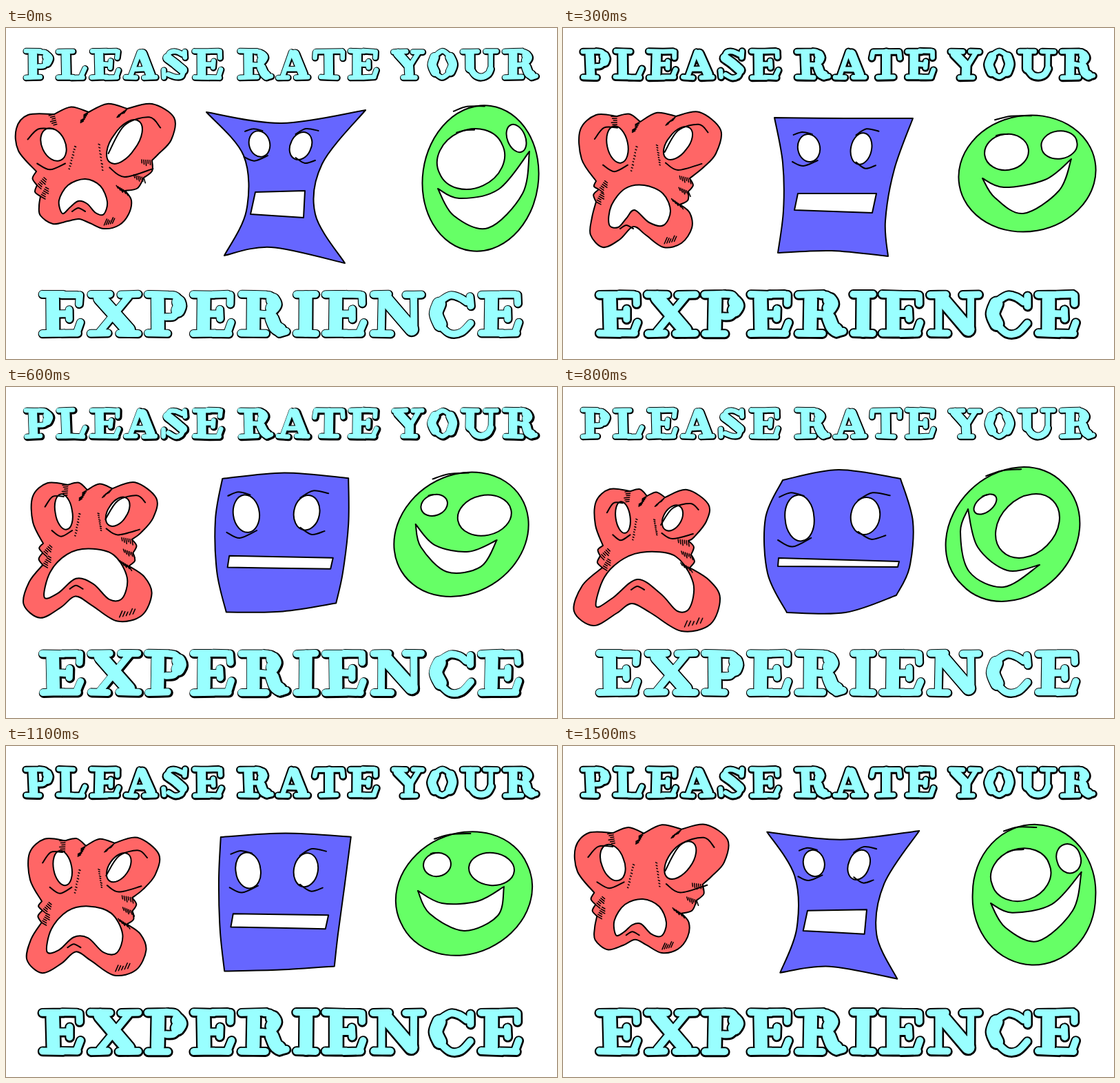
An HTML page that plays this animation: 800 px wide and 480 px high, repeating every 1600 ms.

```html
<!DOCTYPE html>
<html lang="en">
<head>
<meta charset="utf-8">
<title>Please rate your experience</title>
<style>
html, body { margin: 0; width: 100%; height: 100%; overflow: hidden; background: #fff; }
svg { display: block; width: 800px; height: 480px; }
path { fill: none; stroke: #000; stroke-width: 2; stroke-linejoin: round; stroke-linecap: round; }
</style>
</head>
<body>
<svg id="stage" viewBox="0 0 800 480" role="img" aria-label="Please rate your experience"></svg>
<script>
const STEP = 100, STEPS = 16, LAST = 8;

// Pen strokes on a 100 x 100 box; a, b and c are nibs from thick to thin
const nibs = { a: 28, b: 20, c: 15 };
const stem = 'a 31,18 31,82;c 8,8 54,8;c 8,92 54,92;';
const glyphs = {
  P: [46, stem + 'a 78,24 82,32 77,42;c 50,8 70,10 80,20;c 50,56 66,55 78,44'],
  L: [48, stem + 'c 50,92 86,92;c 80,90 91,64'],
  E: [48, stem + 'c 50,8 84,8;c 89,9 89,28;c 40,50 62,50;c 67,40 67,61;c 50,92 86,92;c 84,90 92,68'],
  A: [53, 'c 46,10 22,86;a 55,17 79,83;c 8,92 36,92;c 60,92 93,92;c 36,66 64,66'],
  S: [46, 'a 25,29 50,47 77,69;c 24,26 32,11 52,9 74,18;c 83,9 83,29;c 76,74 70,88 50,92 28,82;c 11,70 12,92'],
  R: [56, stem + 'a 68,20 72,28 67,37;c 50,8 62,9 70,16;c 44,51 58,51 68,42;a 66,60 72,78 80,85;c 80,92 93,88'],
  T: [52, 'a 50,15 50,82;c 12,9 88,9;c 10,11 8,30;c 90,11 92,30;c 27,92 73,92'],
  Y: [53, 'a 21,16 50,52;c 82,12 58,52;a 53,54 53,82;c 8,9 44,9;c 64,9 92,9;c 34,92 72,92'],
  O: [47, 'a 24,26 16,50 24,74;a 76,26 84,50 76,74;c 24,24 50,8 76,24;c 24,76 50,92 76,76'],
  U: [62, 'a 26,16 26,62;b 28,64 38,84 54,90 70,82 77,64;c 78,66 78,12;c 8,9 44,9;c 64,9 92,9'],
  X: [59, 'a 25,15 75,85;c 76,12 24,88;c 8,8 42,8;c 62,8 92,8;c 8,92 38,92;c 58,92 93,92'],
  I: [30, 'a 50,15 50,85;c 15,8 85,8;c 15,92 85,92'],
  N: [60, 'c 22,12 22,88;a 28,17 74,83;c 79,12 79,86;c 8,8 34,8;c 64,8 92,8;c 8,92 38,92'],
  C: [50, 'a 24,28 17,50 25,72;c 24,24 46,9 66,13 82,24;c 89,12 90,33;c 25,74 46,92 70,90 90,70']
};
const words = [
  { text: 'PLEASE', from: 25, to: 318, y: 30, h: 45 },
  { text: 'RATE', from: 335, to: 543, y: 30, h: 45 },
  { text: 'YOUR', from: 558, to: 775, y: 30, h: 45 },
  { text: 'EXPERIENCE', from: 47, to: 752, y: 381, h: 67 }
];
const inks = [
  { line: 1.6, dx: .5, dy: .6 },
  { line: 2.4, dx: .2, dy: .5 },
  { line: 2, dx: 1.2, dy: 1 }
];
const inkOrder = [0, 1, 2, 1];

// Key poses at the steps in "at". "/" is a corner; a lone point after it makes a bump.
// Ellipses are cx cy rx ry turn. Marks are drawn in units of each eye.
const faces = [
  {
    fill: '#f66', at: [0, 3, 8],
    body: [
      '44,208 18,178 15,146 32,126 70,125 / 120,122 / 176,117 / 212,110 244,130 240,162 222,182 212,192 / 200,217 / 173,236 / 182,250 178,270 164,286 142,291 122,283 106,277 90,280 68,284 50,272 48,258 50,244 / 45,228 /',
      '48,222 27,190 25,148 48,126 78,128 / 112,136 / 164,128 / 198,122 229,148 222,182 204,202 184,218 / 182,237 / 170,256 / 184,268 187,290 172,312 146,318 120,300 102,288 82,307 58,318 40,300 42,275 48,252 / 52,234 /',
      '58,230 47,200 48,166 68,148 98,151 / 122,158 / 148,160 / 180,149 211,170 208,195 190,218 182,223 / 186,243 / 184,262 / 212,280 228,306 214,344 172,354 128,328 100,314 78,328 44,346 16,325 28,288 57,262 / 54,245 /'
    ],
    mouth: [
      '82,269 77,250 90,228 115,219 137,229 147,252 142,270 130,268 118,255 105,251 93,260',
      '67,285 70,258 90,233 118,228 145,240 156,265 146,286 125,282 104,264 92,276 80,289',
      '48,318 60,276 88,249 122,239 164,246 189,284 184,320 166,325 142,300 108,279 72,306'
    ],
    eyes: [
      '69 169 17 25 -25;172 165 18 34 35',
      '79 169 15 27 -12;167 167 15 26 38',
      '87 189 10.5 23 -8;159 190 13 20 30'
    ],
    marks: [
      '-2.2,-.3 -1.3,-.9 0,-.9;-1.4,1.1 -.3,1.45 1,1.1',
      '-1.3,.5 0,-.7 2,-1.05 2.9,-.6;-1.2,1.1 0,1.5 2.3,1.15'
    ],
    nose: ['1.8,.1 1.3,1.4', '-2.1,.1 -1.8,1.2']
  },
  {
    fill: '#66f', at: [0, 3, 8],
    body: [
      '291,122 400,138 522,119 / 459,197 449,270 492,341 / 385,318 317,330 / 349,265 345,185',
      '307,130 410,131 508,131 / 481,205 468,280 472,331 / 390,323 312,326 / 320,265 319,195',
      '319,135 400,120 490,133 / 508,195 503,262 484,302 / 410,327 325,327 / 297,270 294,190'
    ],
    mouth: [
      '362,238 / 434,236 / 432,275 / 355,270 /',
      '341,240 / 455,240 / 449,268 / 336,264 /',
      '313,248 / 488,253 / 486,261 / 312,260 /'
    ],
    eyes: [
      '368 168 15 19 -15;428 171 15 20 25',
      '357 174 16 20 -10;433 175 15 23 12',
      '343.5 190 21 32 -5;439 187 21 27 10'
    ],
    marks: [
      '-1.4,-.95 -.6,-1.15 .3,-1;-1.5,1 -.5,1.3 .8,.9',
      '-.5,-.85 .5,-1.25 1.7,-1.1;-.5,.85 .4,1.25 1.4,1.05'
    ]
  },
  {
    fill: '#6f6', at: [0, 3, 5, 8],
    body: ['689 218 84 106 8', '674 211 100 84 -10', '665 214 101 85 -25', '653 213.5 104 86 -45'],
    mouth: [
      '627,233 658,247 715,234 760,179 / 750,240 700,290 650,272',
      '609,218 640,231 700,220 738,190 / 720,236 668,269 627,246',
      '598,210 633,228 685,225 723,204 / 714,246 665,268 615,243',
      '588,177 602,232 645,266 692,258 / 640,290 590,268 577,210'
    ],
    eyes: [
      '675 190 50 41 -25;741 160 13 21 -22',
      '644 180 32 26 -8;720.5 169.5 26 19 -8',
      '626 172 20 17 -10;705 178.5 33 23.5 5',
      '613 170 19 11 -38;674.5 201.5 52 40 -45'
    ]
  }
];

const points = s => (s.match(/\S+/g) || []).map(p => p.split(',').map(Number));
const oval = s => s.split(' ').map(Number);
const list = s => s.split(';');
const fix = v => +v.toFixed(1);
const lerp = (a, b, f) => a.map((v, i) => v + (b[i] - v) * f);
const rad = a => a * Math.PI / 180;

// Smooth curve through points, without the opening move
function run(p, closed) {
  const n = p.length;
  const at = i => p[closed ? (i + n) % n : Math.max(0, Math.min(n - 1, i))];
  let d = '';
  for (let i = 0; i < (closed ? n : n - 1); i++) {
    const a = at(i - 1), b = at(i), c = at(i + 1), e = at(i + 2);
    const b2 = b.map((v, j) => fix(v + (c[j] - a[j]) / 6));
    const c2 = c.map((v, j) => fix(v - (e[j] - b[j]) / 6));
    d += `C${b2} ${c2} ${c.map(fix)}`;
  }
  return d;
}
const curve = p => 'M' + p[0].map(fix) + run(p);

function bump(p, q) {
  const dx = q[0] - p[0], dy = q[1] - p[1], out = .1 + 4 / Math.hypot(dx, dy);
  const [x, y] = lerp(p, q, .5);
  return [p, [x + dy * out, y - dx * out], q];
}

function shape(s, lumpy) {
  if (!s.includes(',')) return ellipse(s);
  const parts = s.split('/').map(points), first = parts[0][0];
  if (parts.length === 1) return 'M' + first + run(parts[0], true) + 'Z';
  parts[parts.length - 1].push(first);
  let d = 'M' + first, end = first;
  parts.forEach((part, i) => {
    const p = i ? [end, ...part] : part;
    d += run(lumpy && p.length === 2 ? bump(...p) : p);
    end = part[part.length - 1];
  });
  return d + 'Z';
}

function ellipse(s) {
  const [x, y, rx, ry, turn] = oval(s), u = rx * Math.cos(rad(turn)), v = rx * Math.sin(rad(turn));
  const arc = k => `A${rx} ${ry} ${turn} 1 1 ${fix(x + u * k)} ${fix(y + v * k)}`;
  return `M${fix(x + u)} ${fix(y + v)}${arc(-1)}${arc(1)}Z`;
}

// Loose pen stroke that drifts onto the top of an oval
function tail(s) {
  const [x, y, rx, ry, turn] = oval(s), t = rad(turn);
  return curve([[-118, 1.06], [-105, 1.03], [-88, .99]].map(([a, r]) => {
    const u = rx * r * Math.cos(rad(a) - t), v = ry * r * Math.sin(rad(a) - t);
    return [x + u * Math.cos(t) - v * Math.sin(t), y + u * Math.sin(t) + v * Math.cos(t)];
  }));
}

function hatch(p, q, n, dx, dy) {
  let d = '';
  for (let i = 0; i < n; i++) {
    const long = 1 - (i % 3) * .2;
    d += `M${lerp(p, q, i / (n - 1)).map(fix)}l${fix(dx * long)} ${fix(dy * long)}`;
  }
  return d;
}

const onEye = (eye, s) => {
  const [x, y, rx, ry] = oval(eye);
  return points(s).map(([u, v]) => [x + u * rx, y + v * ry]);
};

// Ticks run from each corner of the outline towards the middle of the face
function shade(body, eyes, nose) {
  const parts = body.split('/').map(points).filter(p => p.length);
  const ends = parts.map(p => p[p.length - 1]);
  const mid = lerp(ends[1], ends[6], .5);
  let d = '';
  for (const p of ends) {
    const far = Math.hypot(mid[0] - p[0], mid[1] - p[1]);
    const ux = (mid[0] - p[0]) / far, uy = (mid[1] - p[1]) / far;
    d += hatch(p, [p[0] + ux * 15, p[1] + uy * 15], 6, -uy * 8, Math.abs(ux) * 8);
  }
  const jaw = parts[6], chin = f => lerp(jaw[3], jaw[2], f).map(v => v - 4);
  d += hatch(chin(.2), chin(.75), 5, 4, -9);
  eyes.forEach((eye, i) => {
    d += hatch(...onEye(eye, nose[i]), 9, 2, 1);
  });
  return d;
}

function pose(face, key, step) {
  const { at } = face, i = Math.min(at.length - 2, at.filter(k => k <= step).length - 1);
  const f = (step - at[i]) / (at[i + 1] - at[i]);
  const next = face[key][i + 1].match(/-?[\d.]+/g);
  return face[key][i].replace(/-?[\d.]+/g, v => fix(+v + (next.shift() - v) * f));
}

function look(face, step) {
  const [body, mouth, eyeText] = ['body', 'mouth', 'eyes'].map(key => pose(face, key, step));
  const eyes = list(eyeText);
  let ink = '';
  if (face.marks) {
    eyes.forEach((eye, i) => list(face.marks[i]).forEach(s => ink += curve(onEye(eye, s))));
  } else ink = tail(body) + tail(eyes[0]);
  if (face.nose) {
    const [x, y] = points(mouth)[9];
    ink += curve([[x - 9, y + 15], [x, y + 10], [x + 10, y + 15]]);
  }
  return [
    shape(body, !!face.nose),
    shape(mouth) + eyes.map(ellipse).join(''),
    ink,
    face.nose ? shade(body, eyes, face.nose) : ''
  ];
}

function lettering(word, nib, seed) {
  const wob = () => ((seed = seed * 16807 % 2147483647) / 2147483647 - .5) * 1.2;
  const total = [...word.text].reduce((sum, ch) => sum + glyphs[ch][0], 0);
  let x = word.from, d = '';
  for (const ch of word.text) {
    const [size, strokes] = glyphs[ch], w = size * (word.to - word.from) / total;
    for (const stroke of list(strokes)) {
      if (stroke[0] !== nib) continue;
      d += curve(points(stroke.slice(2)).map(([u, v]) =>
        [x + 1 + u * (w - 3) / 100 + wob(), word.y + v * word.h / 100 + wob()]));
    }
    x += w;
  }
  return d;
}

const stage = document.getElementById('stage');
function path(style) {
  const el = document.createElementNS('http://www.w3.org/2000/svg', 'path');
  Object.assign(el.style, style);
  return stage.appendChild(el);
}

const letters = [];
for (const front of [false, true]) {
  for (const word of words) {
    for (const nib in nibs) {
      letters.push({
        front,
        el: path({ stroke: front ? '#9ff' : '#000' }),
        width: nibs[nib] * word.h / 100,
        looks: inks.map((_, i) => lettering(word, nib, 77 + i * 500))
      });
    }
  }
}

for (const face of faces) {
  face.els = [{ fill: face.fill }, { fill: '#fff' }, {}, { strokeWidth: 1.5 }].map(path);
  face.looks = Array.from({ length: LAST + 1 }, (_, step) => look(face, step));
}

function draw(step) {
  const n = inkOrder[step % inkOrder.length], { line, dx, dy } = inks[n];
  for (const { el, front, width, looks } of letters) {
    el.setAttribute('d', looks[n]);
    el.style.strokeWidth = front ? width : width + line * 2;
    if (!front) el.setAttribute('transform', `translate(${dx} ${dy})`);
  }
  const k = LAST - Math.abs(LAST - step);
  for (const face of faces) face.els.forEach((el, i) => el.setAttribute('d', face.looks[k][i]));
}

function tick() {
  draw(Math.floor(performance.now() / STEP) % STEPS);
  requestAnimationFrame(tick);
}
tick();
</script>
</body>
</html>
```
